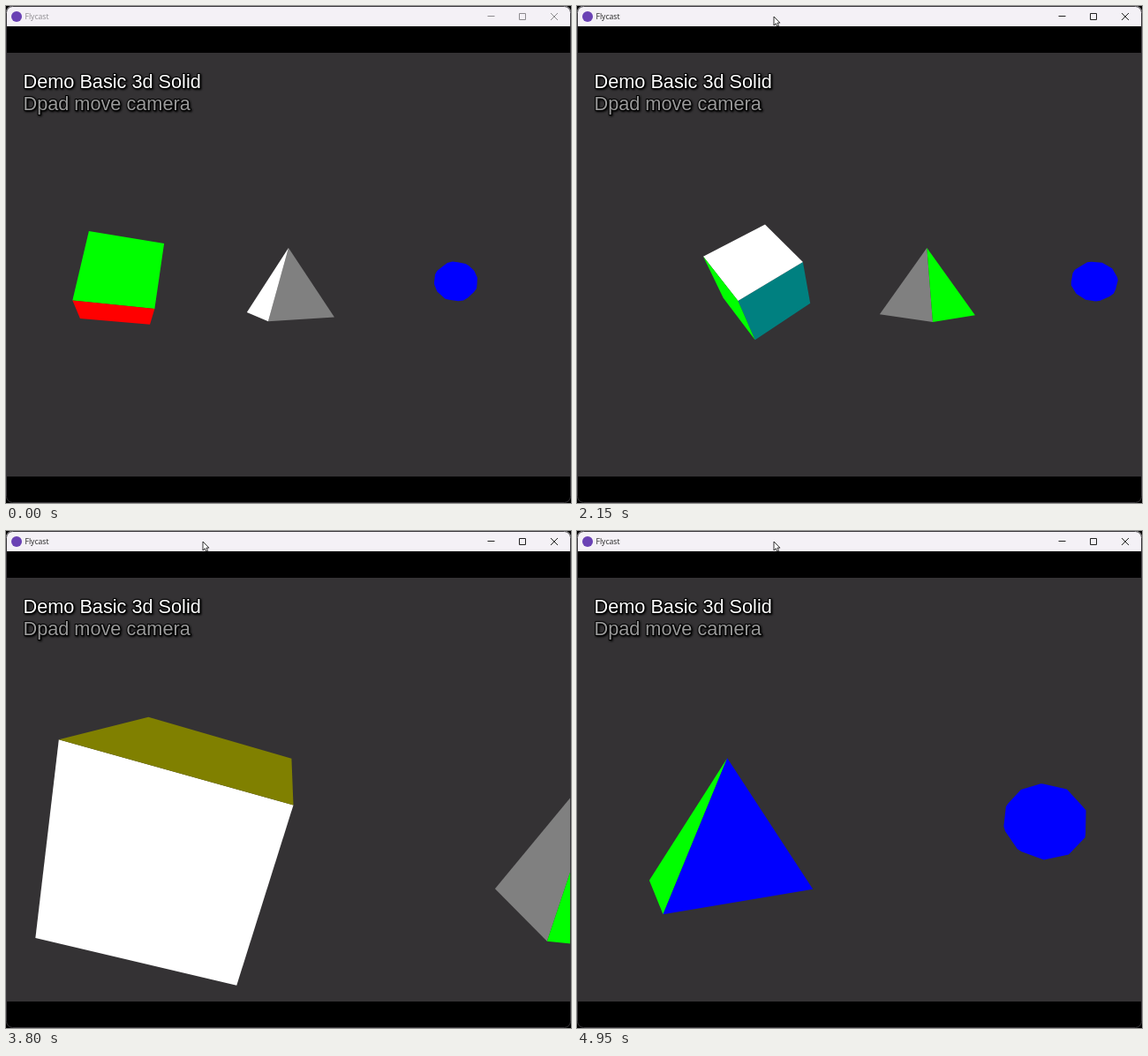
An HTML page with a canvas that plays this animation: 640x563 px, repeating every 5 s.

```html
<!DOCTYPE html>
<html lang="en">
<head>
<meta charset="utf-8">
<title>Basic 3d Solid</title>
<style>
  html, body { margin: 0; width: 100%; height: 100%; overflow: hidden; background: #000; }
  canvas, svg { position: absolute; left: 0; display: block; }
  canvas { top: 53px; background: #343234; }
  svg { top: 0; }
  .title { font: 8.6px "Open Sans", sans-serif; fill: #222; }
  .buttons { fill: none; stroke: #222; stroke-width: 1; }
  .idle .title { fill: #8d8b8f; }
  .idle .buttons { stroke: #8d8b8f; }
  .idle .cursor { display: none; }
  .hud {
    font: 21.7px "Liberation Sans", Arial, sans-serif;
    paint-order: stroke; stroke: #000; stroke-width: 2px; stroke-linejoin: round;
    filter: drop-shadow(1px 1px 1px #000);
  }
</style>
</head>
<body>
<canvas id="view" width="640" height="480"></canvas>
<svg id="chrome" width="640" height="563" viewBox="0 0 640 563">
  <path d="M0 23V7a7 7 0 0 1 7-7H633a7 7 0 0 1 7 7V23Z" fill="#f4f1f6"/>
  <rect x=".5" y=".5" width="639" height="562" rx="7" fill="none" stroke="#3a383c"/>
  <circle cx="12" cy="12" r="6" fill="#6a42b4"/>
  <text class="title" x="21.5" y="15">Flycast</text>
  <g class="buttons">
    <path d="M545.5 11.5h8M581.5 8.5h7v7h-7ZM617 8l8 8M625 8l-8 8"/>
  </g>
  <path class="cursor" d="M223 12v10l2.3-2.2 1.6 3.4 1.7-.8-1.6-3.3h2.9Z" fill="#fff" stroke="#000" stroke-width=".8"/>
  <text class="hud" x="19.5" y="93" fill="#fff">Demo Basic 3d Solid</text>
  <text class="hud" x="19.5" y="118" fill="#999">Dpad move camera</text>
</svg>
<script>
const LOOP = 5000, STEP = 50, FOCUS = 0.1;
const FOCAL = 240 / Math.tan(Math.PI / 6);
const ctx = document.getElementById('view').getContext('2d');
const chrome = document.getElementById('chrome');

// Tracks of [seconds, value]; the camera moves about 6 units a second while a key is held.
const camX = [[0, 0], [.9, 0], [1.165, 1.59], [1.548, 1.59], [2.315, -3.01],
  [2.7, -.7], [3.283, -.7], [3.875, -4.25], [4.932, 2.09], [5, 2.09]];
const camZ = [[0, 11], [2.718, 11], [3.879, 3.82], [4.62, 3.82], [5, 6.1]];
const spin = [[0, -22.7], [1.3, 20.8], [2.15, 49.3], [3.15, 83.7], [3.8, 106.4], [5, 147.8]];

function at(track, t) {
  const i = Math.max(1, track.findIndex(k => k[0] >= t));
  const [t0, v0] = track[i - 1], [t1, v1] = track[i];
  return v0 + (v1 - v0) * (t - t0) / (t1 - t0);
}

const cube = ['#008080', '#fff', '#0f0', '#808000', '#f00', '#00f'].map((color, k) => {
  const axis = k % 3, side = k < 3 ? 1 : -1;
  const points = [[-1, -1], [1, -1], [1, 1], [-1, 1]].map(([u, v]) => {
    const p = [];
    p[axis] = side;
    p[(axis + 1) % 3] = u * side;
    p[(axis + 2) % 3] = v;
    return p;
  });
  return { color, points };
});

const corner = k => {
  const a = (k + .5) * Math.PI / 2;
  return [Math.SQRT2 * Math.sin(a), -1, Math.SQRT2 * Math.cos(a)];
};
const pyramid = ['#808080', '#0f0', '#00f', '#fff'].map((color, k) => (
  { color, points: [[0, 1, 0], corner(k - 1), corner(k)] }));

const CUTS = 10, RADIUS = .6;
const ball = [];
const onBall = (i, j) => {
  const a = i * 2 * Math.PI / CUTS, b = j * Math.PI / CUTS;
  return [Math.sin(b) * Math.cos(a), Math.sin(b) * Math.sin(a), Math.cos(b)].map(v => v * RADIUS);
};
for (let i = 0; i < CUTS; i++) {
  for (let j = 0; j < CUTS; j++) {
    ball.push({ color: '#00f', points: [onBall(i, j), onBall(i, j + 1), onBall(i + 1, j + 1), onBall(i + 1, j)] });
  }
}

function project([x, y, z], rx, ry, cx, depth) {
  const x1 = x * Math.cos(ry) + z * Math.sin(ry);
  const z1 = z * Math.cos(ry) - x * Math.sin(ry);
  const y2 = y * Math.cos(rx) - z1 * Math.sin(rx);
  const z2 = y * Math.sin(rx) + z1 * Math.cos(rx);
  const s = FOCAL / (depth - z2);
  return [320 + (cx + x1) * s, 240 - (y2 - .5) * s];
}

const area = pts => pts.reduce((sum, [x, y], i) => {
  const [nx, ny] = pts[(i + 1) % pts.length];
  return sum + x * ny - nx * y;
}, 0);

function solid(faces, rx, ry, cx, depth) {
  const paths = {};
  for (const { color, points } of faces) {
    const pts = points.map(p => project(p, rx, ry, cx, depth));
    if (area(pts) >= 0) continue;
    const path = paths[color] ||= new Path2D();
    pts.forEach(([x, y], i) => i ? path.lineTo(x, y) : path.moveTo(x, y));
    path.closePath();
  }
  for (const color in paths) {
    ctx.fillStyle = color;
    ctx.fill(paths[color]);
  }
}

function draw(t) {
  const x = at(camX, t), depth = at(camZ, t), a = at(spin, t) * Math.PI / 180;
  ctx.clearRect(0, 0, 640, 480);
  solid(cube, a, -a, -5 - x, depth);
  solid(pyramid, 0, -a, -x, depth);
  solid(ball, a, -a, 5 - x, depth);
  chrome.classList.toggle('idle', t < FOCUS);
}

const start = performance.now();
function tick() {
  const ms = (performance.now() - start) % LOOP;
  draw(Math.floor(ms / STEP) * STEP / 1000);
  requestAnimationFrame(tick);
}
tick();
</script>
</body>
</html>
```
